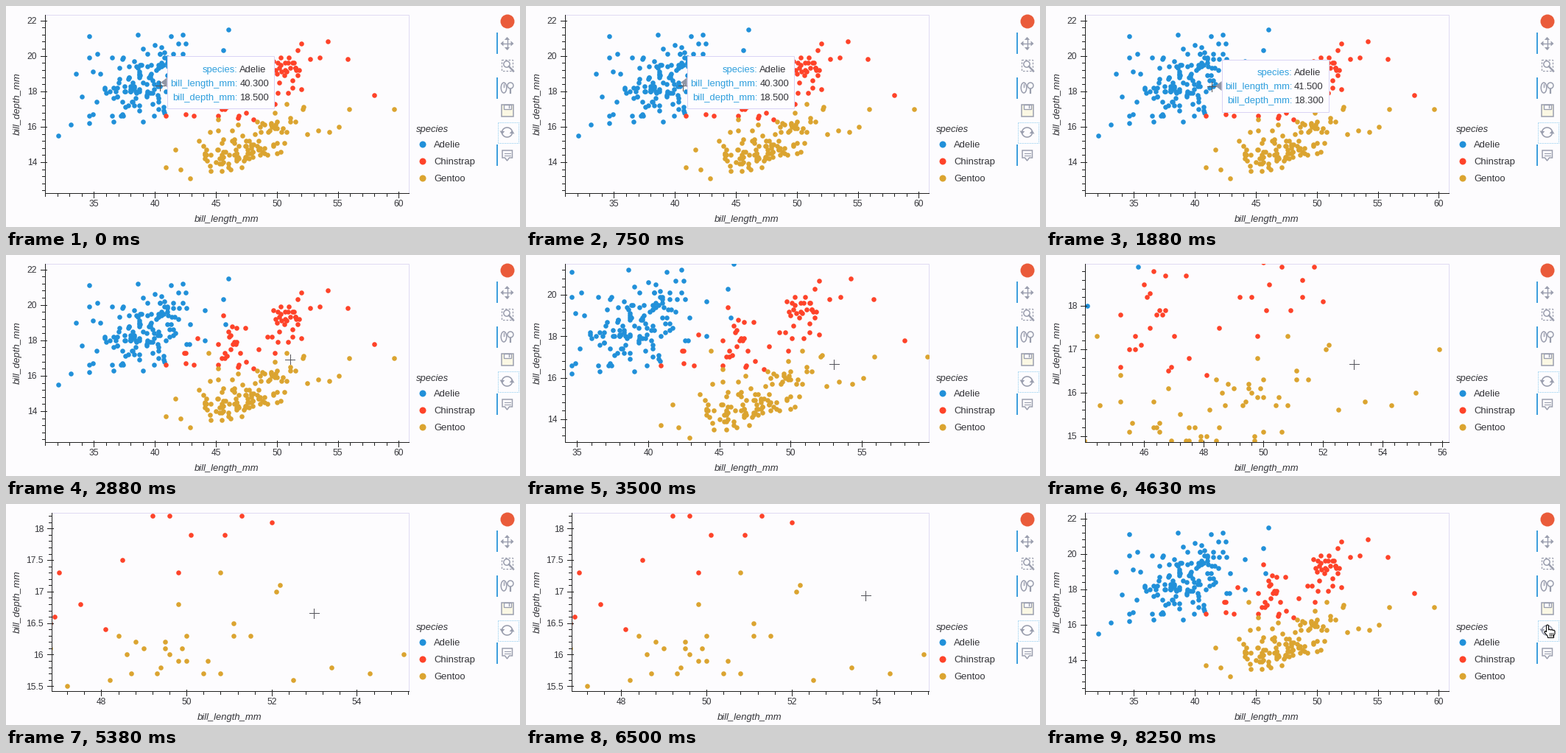
Recreate the animation shown at these times as a matplotlib script. Size 698 by 300 pixels, loop 8370 ms.

```python
import math

import numpy as np
import matplotlib.pyplot as plt
from matplotlib.animation import FuncAnimation
from matplotlib.patches import Circle, Ellipse, Polygon, Rectangle

W, H, DPI = 698, 300, 64
FRAMES, INTERVAL, STEP = 279, 30, 125
PT = 72 / DPI

LEFT, RIGHT, TOP, BOTTOM = 52.5, 546.5, 11.5, 253.5
FOCUS_PX, FOCUS = (418, 148), (53.03, 16.66)
SCALE = (16.56, 24.06)

BG, INK, GREY, ACCENT = "#fdfcfe", "#333338", "#9a9eae", "#2f9fdd"
COLORS = {"Adelie": "#2190d9", "Chinstrap": "#fe4329", "Gentoo": "#dba430"}

# Landmark points by bill depth; the dense clouds are filled in at random.
ROWS = {
    "Adelie": {
        21.5: [46], 21.2: [38.6, 42.3], 21.1: [34.6, 41.3], 20.7: [42.5],
        20.3: [45.6], 19.7: [44.1], 19: [33.5], 18.9: [45.8], 18.5: [40.3],
        18.3: [41.5], 18: [44.1], 16.1: [33.1], 15.5: [32.1],
    },
    "Chinstrap": {
        20.8: [54.2], 20.7: [52], 20.3: [51.7], 19.9: [53.5],
        19.8: [52.7, 55.8], 19.4: [45.6], 18.2: [46.1, 49.2, 49.6, 51.3],
        18.1: [43.5, 52], 17.9: [46.5, 46.7, 50.1, 50.9],
        17.8: [45.2, 46.4, 46.6, 58], 17.5: [46.2, 48.5],
        17.3: [42.4, 42.5, 45.7, 47, 49.8], 17.1: [45.9], 17: [45.5, 45.7],
        16.8: [47.5], 16.7: [42.5], 16.6: [40.9, 43.2, 45.2, 46.9],
        16.5: [46.8], 16.4: [48.1],
    },
    "Gentoo": {
        17.3: [44.4, 50.8], 17.1: [52.2], 17: [52.1, 55.9, 59.6],
        16.8: [49.8], 16.5: [51.1], 16.4: [45.2],
        16.3: [48.4, 50, 51.1, 51.5], 16.2: [48.8, 49.5],
        16.1: [46.8, 49, 49.5, 49.9], 16: [48.6, 49.6, 55.1],
        15.9: [49.8, 50, 50.5], 15.8: [45.2, 46.3, 49.4, 53.4],
        15.7: [44.5, 48.7, 49.3, 50.4, 50.8, 54.3], 15.6: [48.2, 52.5],
        15.5: [47.2], 14.7: [41.7], 13.7: [40.9], 13.1: [42.9],
    },
}

rng = np.random.default_rng(12)


def cloud(n, mean, sd, slope, lo, hi):
    """Correlated scatter of n points inside a box, rounded to 0.1 mm."""
    pts = []
    while len(pts) < n:
        x = rng.normal(mean[0], sd[0])
        y = mean[1] + slope * (x - mean[0]) + rng.normal(0, sd[1])
        if lo[0] <= x <= hi[0] and lo[1] <= y <= hi[1]:
            pts.append((round(x, 1), round(y, 1)))
    return pts


CLOUDS = {
    "Adelie": cloud(135, (38.8, 18.35), (2.5, 1.1), 0.18, (34, 16.2), (43.2, 20.7)),
    "Chinstrap": cloud(5, (46.1, 18.6), (0.8, 0.2), 0, (45.2, 18.3), (47.6, 18.9))
    + cloud(24, (50.6, 19.2), (0.9, 0.45), 0, (49, 18.4), (52.2, 20)),
    "Gentoo": cloud(82, (46.8, 14.6), (2.1, 0.5), 0.13, (42, 13.2), (51, 15.4)),
}
DATA = {
    name: np.array([(x, y) for y, xs in rows.items() for x in xs] + CLOUDS[name])
    for name, rows in ROWS.items()
}

# Keyframes on the 125 ms step clock
ZOOM_T = [26, 28, 33, 37, 42, 61.9, 62]
ZOOM_V = [0, 0.155, 0.619, 0.894, 1.269, 1.269, 0]
PATH_T = [0, 5, 9, 15, 18, 24, 48, 51, 56, 60]
PATH_X = [209, 209, 225, 225, 225, 418, 418, 461, 461, 681]
PATH_Y = [108, 108, 109, 109, 109, 148, 148, 124, 124, 164]
HOVERS = [(0, 7, (40.3, 18.5)), (8, 18, (41.5, 18.3))]

fig = plt.figure(figsize=(W / DPI, H / DPI), dpi=DPI, facecolor=BG)
ax = fig.add_axes([0, 0, 1, 1])
ax.set_xlim(0, W)
ax.set_ylim(H, 0)
ax.axis("off")


def text(x, y, s, size=13, **kw):
    kw = {"color": INK, "va": "baseline", **kw}
    return ax.text(x, y, s, fontsize=size * PT, family="Liberation Sans", **kw)


def line(xs, ys, color=GREY, lw=1.4, **kw):
    return ax.plot(xs, ys, color=color, lw=lw * PT, **kw)[0]


def patch(p, z=2):
    p.set_zorder(z)
    return ax.add_patch(p)


def poly(pts, fill=GREY, edge="none", lw=0, z=2):
    return patch(Polygon(pts, fc=fill, ec=edge, lw=lw * PT), z)


def box(x, y, w, h, edge=GREY, lw=1.3, fill="none", z=2, **kw):
    return patch(Rectangle((x, y), w, h, fc=fill, ec=edge, lw=lw * PT, **kw), z)


def ring(x, y, r, lw=1.5):
    patch(Circle((x, y), r, fc=BG, ec=GREY, lw=lw * PT), 3)


def draw_toolbar():
    patch(Circle((681, 21), 9.5, fc="#ea5b3a", ec="none"))
    for y in (36, 97, 188):
        box(666, y, 2.4, 29, edge="none", fill="#3f9fdd")
    # pan
    line([674, 687], [51, 51])
    line([680.5, 680.5], [44, 58])
    for a in range(4):
        c, s = round(math.cos(a * math.pi / 2)), round(math.sin(a * math.pi / 2))
        poly([(680.5 + c * u - s * v, 51 + s * u + c * v)
              for u, v in ((9, 0), (5, -3.6), (5, 3.6))])
    # box zoom
    box(672.5, 72.5, 15, 15, ls=(0, (2, 1.5)))
    ring(680, 79, 4.2)
    line([683, 689], [82, 88.5], lw=2.4, zorder=4)
    # wheel zoom
    patch(Ellipse((676, 111), 7.5, 14, fc="none", ec=GREY, lw=1.5 * PT))
    line([676, 676], [106, 110])
    ring(685, 108, 4)
    line([685, 685], [112, 118], lw=2.2)
    # save
    box(672.5, 134, 16.5, 16, fill="#fbf8e4", lw=1.5)
    box(676, 134, 9.5, 5.5, fill=BG)
    line([682.5, 682.5], [135, 138])
    # reset
    box(667.5, 157.5, 28, 28.5, edge="#86c9ee", lw=1, ls=(0, (1, 1.3)))
    for a in (0, math.pi):
        t = np.linspace(a + 0.35, a + 2.75, 20)
        line(680.5 + 7 * np.cos(t), 171.5 + 6.5 * np.sin(t), lw=1.6)
        c = math.cos(a)
        poly([(680.5 + c * u, 171.5 + c * v)
              for u, v in ((3.2, 1.5), (10, 2), (7, -3))])
    # hover
    poly([(674, 196), (687.5, 196), (687.5, 206), (683.5, 206), (680.5, 210),
          (677.5, 206), (674, 206)], "none", GREY, 1.5)
    for y in (199.5, 202.5):
        line([676.5, 685], [y, y], lw=1.1)


def draw_legend():
    text(557, 170.5, "species", style="italic")
    for i, (name, color) in enumerate(COLORS.items()):
        y = 188 + 23 * i
        patch(Circle((566, y), 4.5, fc=color, ec="none"))
        text(581, y + 4.5, name)


draw_toolbar()
draw_legend()

frame = box(LEFT, TOP, RIGHT - LEFT, BOTTOM - TOP, edge="#e0dbf3", lw=1, z=1)
dots = {
    name: line([], [], c, 0, marker="o", ms=6.6 * PT, mew=0, zorder=3)
    for name, c in COLORS.items()
}
spine = line([], [], "#222222", 1, zorder=4)
ticks = line([], [], "#222222", 1, zorder=4)
x_labels = [text(0, 272, "", 12, ha="center") for _ in range(12)]
y_labels = [text(0, 0, "", 12, ha="right") for _ in range(12)]
x_title = text(0, 293, "bill_length_mm", style="italic", ha="center")
y_title = text(19, 132.5, "bill_depth_mm", style="italic", ha="center",
               rotation=90, rotation_mode="anchor")

cross = line([], [], "#55555c", 1, zorder=6)
HAND = np.array([
    (-1.5, 1), (0, 0), (1.5, 1), (1.5, 7), (3, 6), (4.5, 7), (6, 6.5),
    (7.5, 7.5), (9, 7.3), (10, 8.5), (10, 12), (8.5, 15), (8.5, 17.5),
    (0.5, 17.5), (0, 15), (-4, 10.5), (-4, 9), (-2.5, 8.5), (-1.5, 9.8)])
hand = poly(HAND, "white", "#111111", 1.2, z=8)
knuckles = line([], [], "#111111", 0.9, zorder=9)

tip_box = box(0, 0, 145, 71, edge="#d9d3f5", lw=1, fill="#fefdff", z=7)
tip_arrow = poly([(0, 0)] * 3, "#9296a6", z=7)
tip_keys = [text(0, 0, s + ":", color=ACCENT, ha="right", zorder=8)
            for s in ("species", "bill_length_mm", "bill_depth_mm")]
tip_vals = [text(0, 0, "", zorder=8) for _ in range(3)]
tip = [tip_box, tip_arrow, *tip_keys, *tip_vals]


def tick_step(span):
    """Interval of 1, 2 or 5 times a power of ten giving about six ticks."""
    options = [m * 10.0 ** e for e in (-1, 0, 1) for m in (1, 2, 5)]
    return min(options, key=lambda s: abs(6 - span / s))


def multiples(step, lo, hi):
    return np.arange(math.ceil(lo / step - 1e-9), math.floor(hi / step + 1e-9) + 1) * step


def set_labels(pool, values, place):
    for i, label in enumerate(pool):
        shown = i < len(values)
        label.set_visible(shown)
        if shown:
            label.set_text(f"{values[i]:g}")
            label.set_position(place(values[i]))


def draw_plot(zoom):
    kx, ky = SCALE[0] * zoom, SCALE[1] * zoom
    x0 = FOCUS[0] - (FOCUS_PX[0] - LEFT) / kx
    x1 = FOCUS[0] + (RIGHT - FOCUS_PX[0]) / kx
    y0 = FOCUS[1] - (BOTTOM - FOCUS_PX[1]) / ky
    y1 = FOCUS[1] + (FOCUS_PX[1] - TOP) / ky
    sx, sy = tick_step(x1 - x0), tick_step(y1 - y0)
    left = LEFT + 9 if sy < 1 else LEFT

    def px(v):
        return left + (v - x0) * (RIGHT - left) / (x1 - x0)

    def py(v):
        return FOCUS_PX[1] - (v - FOCUS[1]) * ky

    frame.set_bounds(left, TOP, RIGHT - left, BOTTOM - TOP)
    for name, pts in DATA.items():
        dots[name].set_data(px(pts[:, 0]), py(pts[:, 1]))
        dots[name].set_clip_path(frame)

    spine.set_data([left, left, RIGHT], [TOP, BOTTOM, BOTTOM])
    xs, ys = [], []
    for part, inside, out in ((1, 2, 6), (5, 0, 4)):
        for v in multiples(sx / part, x0, x1):
            xs += [px(v), px(v), np.nan]
            ys += [BOTTOM - inside, BOTTOM + out, np.nan]
        for v in multiples(sy / part, y0, y1):
            xs += [left + inside, left - out, np.nan]
            ys += [py(v), py(v), np.nan]
    ticks.set_data(xs, ys)
    set_labels(x_labels, multiples(sx, x0, x1), lambda v: (px(v), 272.3))
    set_labels(y_labels, multiples(sy, y0, y1), lambda v: (left - 10.5, py(v) + 4.3))
    x_title.set_x((left + RIGHT) / 2)
    return px, py


def draw_cursor(x, y):
    cross.set_visible(x < RIGHT)
    cross.set_data([x - 6.5, x + 6.5, np.nan, x, x], [y, y, np.nan, y - 6.5, y + 6.5])
    over = x > 667
    hand.set_visible(over)
    knuckles.set_visible(over)
    hand.set_xy(HAND + (x, y))
    kx = [x + 2.5, x + 2.5, np.nan, x + 4.7, x + 4.7, np.nan, x + 7, x + 7]
    knuckles.set_data(kx, [y + 11, y + 15, np.nan] * 2 + [y + 11, y + 15])


def draw_tip(step, px, py):
    point = next((p for a, b, p in HOVERS if a <= step <= b), None)
    for artist in tip:
        artist.set_visible(point is not None)
    if point is None:
        return
    x, y = px(point[0]), py(point[1])
    tip_box.set_xy((x + 11.5, y - 35.5))
    tip_arrow.set_xy([(x + 3, y), (x + 11.5, y - 6.5), (x + 11.5, y + 6.5)])
    values = ("Adelie", f"{point[0]:.3f}", f"{point[1]:.3f}")
    for i, (key, val) in enumerate(zip(tip_keys, tip_vals)):
        base = y + 19 * (i - 1) + 4.8
        key.set_position((x + 107, base))
        val.set_position((x + 110, base))
        val.set_text(values[i])


def update(i):
    step = (i * INTERVAL + 25) // STEP
    px, py = draw_plot(math.exp(np.interp(step, ZOOM_T, ZOOM_V)))
    draw_cursor(np.interp(step, PATH_T, PATH_X), np.interp(step, PATH_T, PATH_Y))
    draw_tip(step, px, py)
    return []


anim = FuncAnimation(fig, update, frames=FRAMES, interval=INTERVAL,
                     repeat=True, repeat_delay=0, blit=False)
plt.show()
```
